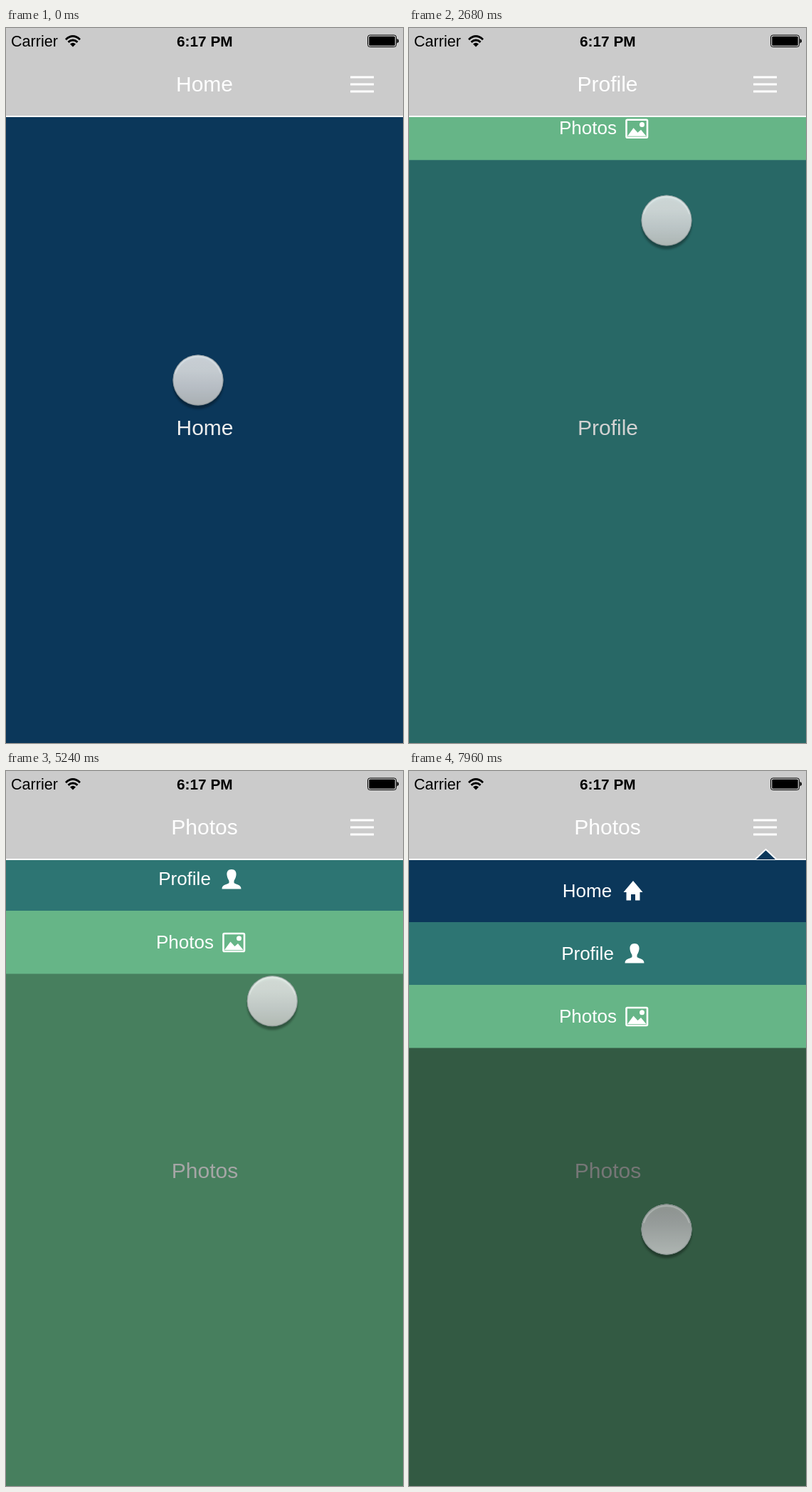
Animation of 558 by 1003 pixels, one loop 8000 ms. Source, as an HTML page:

```html
<!DOCTYPE html>
<html lang="en">
<head>
<meta charset="utf-8">
<title>Drop-down menu</title>
<style>
html, body { margin: 0; width: 100%; height: 100%; overflow: hidden; background: #0b375a; }
svg { display: block; width: 100%; height: 100%; }
text { font-family: "Liberation Sans", Arial, sans-serif; }
.big { font-size: 30px; text-anchor: middle; }
.row { font-size: 26px; text-anchor: middle; fill: #fff; }
</style>
</head>
<body>
<svg viewBox="0 0 558 1003">
  <defs>
    <linearGradient id="up" x2="0" y2="1">
      <stop offset="0" stop-color="#fff"/>
      <stop offset=".3" stop-color="#fafafa"/>
      <stop offset=".65" stop-color="#e8e8ea"/>
      <stop offset="1" stop-color="#d6d6d3"/>
    </linearGradient>
    <linearGradient id="down" x2="0" y2="1">
      <stop offset="0" stop-color="#aaa"/>
      <stop offset=".4" stop-color="#b8b8ba"/>
      <stop offset="1" stop-color="#d6d8d8"/>
    </linearGradient>
    <filter id="soft" x="-20%" y="-20%" width="140%" height="140%"><feGaussianBlur stdDeviation="1.8"/></filter>
    <clipPath id="below"><path d="M0 124H558V1003H0Z"/></clipPath>
  </defs>

  <rect id="page" width="558" height="1003"/>
  <text id="label" class="big" x="279.5" y="571" fill="#ededed"/>
  <rect id="shade" y="124" width="558" height="879"/>

  <g clip-path="url(#below)">
    <g id="menu">
      <path fill="#0b375a" d="M0 124H558V212H0Z"/>
      <path fill="#2d7573" d="M0 212H558V300H0Z"/>
      <path fill="#66b587" d="M0 300H558V388.500H0Z"/>
      <text class="row" x="250.500" y="176.500">Home</text>
      <text class="row" x="251" y="264.500">Profile</text>
      <text class="row" x="251.500" y="352.800">Photos</text>
      <g fill="#fff">
        <path d="M315 154L328.500 170H324.500V181.500H318V173H312V181.500H305.500V170H301.500Z"/>
        <path d="M317 242C322 242 324 245.500 323.500 250C323 254 321.500 256 320.500 258V261C323 263.500 330.500 263 330.500 269.500H303.500C303.500 263 311 263.500 313.500 261V258C312.500 256 311 254 310.500 250C310 245.500 312 242 317 242Z"/>
        <path d="M307 355L315.500 343.500L321.500 350L326 346L333.500 355Z"/>
        <circle cx="327.500" cy="338.700" r="3.500"/>
      </g>
      <rect x="305.500" y="332" width="29.500" height="25" rx="1.500" fill="none" stroke="#fff" stroke-width="2.600"/>
    </g>
  </g>

  <path fill="#cbcbcb" d="M0 0H558V123.500H0Z"/>
  <path stroke="#fff" stroke-width="2" d="M0 124H558"/>
  <path id="arrow" fill="#0b375a" stroke="#fff" stroke-width="2" d="M486.500 124L501.500 110L516.500 124"/>
  <text id="title" class="big" x="279" y="88.500" fill="#fff"/>
  <path id="bars" stroke="#fff" stroke-width="3" d="M484 69H517M484 79H517M484 89H517"/>

  <text x="7" y="26" font-size="21.600">Carrier</text>
  <text x="279.300" y="26" font-size="20.800" font-weight="bold" text-anchor="middle">6:17 PM</text>
  <g fill="none" stroke="#000" stroke-width="2.900">
    <path d="M84 16.200Q94 7 104 16.200M87.500 19.800Q94 14 100.500 19.800"/>
    <path fill="#000" stroke="none" d="M90 22.500Q94 19 98 22.500L94 26.500Z"/>
  </g>
  <rect x="508.500" y="10" width="40" height="16.500" rx="3" fill="none" stroke="#000"/>
  <rect x="510.300" y="11.800" width="36.400" height="12.900" rx="1.500"/>
  <path d="M549.500 15Q552 15.500 552 18.200T549.500 21.500Z"/>

  <g id="cursor">
    <circle cy="5" r="35.500" opacity=".32" filter="url(#soft)"/>
    <g opacity=".78">
      <circle r="35.500" fill="url(#up)"/>
      <g id="press"><circle r="35.500" fill="url(#down)"/></g>
    </g>
    <circle r="35" fill="none" stroke="#7c8688" stroke-opacity=".55" stroke-width="1.200"/>
    <path d="M-32 -9A33.300 33.300 0 0 1 32 -9" fill="none" stroke="#fff" stroke-opacity=".22" stroke-width="2"/>
  </g>
</svg>
<script>
const $ = id => document.getElementById(id);
const LOOP = 8000, STEP = 40, TRAVEL = 264;
const OPEN = 300, CLOSE = 500;

const pages = [
  { from: 0, name: 'Home', color: '#0b375a' },
  { from: 2346, name: 'Profile', color: '#2d7573' },
  { from: 5021, name: 'Photos', color: '#66b587' }
];
const menus = [[1150, 2346], [3980, 5021], [6349, Infinity]];
const taps = [[1070, 1150], [2330, 2440], [3830, 3980], [5020, 5130], [6230, 6345], [7850, 9000]];
const buttonTaps = [taps[0], taps[2], taps[4]];

// time, x, y
const path = [
  [0, 270, 494], [180, 270, 494], [760, 508, 74], [1300, 508, 74],
  [1680, 443, 169], [1880, 382, 236], [2160, 362, 270], [3180, 362, 270],
  [3680, 500, 70], [4140, 500, 70], [4400, 440, 198], [4880, 368, 337],
  [5140, 368, 337], [5440, 404, 258], [6030, 500, 83], [6340, 500, 83],
  [6480, 494, 129], [7310, 362, 643], [LOOP, 362, 643]
];

const clamp = v => Math.min(1, Math.max(0, v));

// cubic-bezier(.42, 0, .58, 1)
function ease(x) {
  x = clamp(x);
  let lo = 0, hi = 1, s = .5;
  for (let i = 0; i < 24; i++) {
    s = (lo + hi) / 2;
    const v = 3 * s * (1 - s) * (.42 * (1 - s) + .58 * s) + s ** 3;
    if (v < x) lo = s; else hi = s;
  }
  return s * s * (3 - 2 * s);
}

const slope = (i, k) => (path[i + 1][k] - path[i][k]) / (path[i + 1][0] - path[i][0]);

// Tangent that never overshoots, zero at rests and turns
function tangent(i, k) {
  if (i === 0 || i === path.length - 1) return 0;
  const a = slope(i - 1, k), b = slope(i, k);
  return a * b > 0 ? 2 * a * b / (a + b) : 0;
}

function along(t, k) {
  let i = 0;
  while (i < path.length - 2 && path[i + 1][0] <= t) i++;
  const p = path[i], q = path[i + 1], d = q[0] - p[0], u = (t - p[0]) / d, v = 1 - u;
  return p[k] * v * v * (1 + 2 * u) + q[k] * u * u * (3 - 2 * u)
    + d * u * v * (tangent(i, k) * v - tangent(i + 1, k) * u);
}

function openness(t) {
  const m = menus.filter(m => t >= m[0]).pop();
  if (!m) return 0;
  return t < m[1] ? ease((t - m[0]) / OPEN) : 1 - ease((t - m[1]) / CLOSE);
}

function held(t, list, fadeIn, fadeOut) {
  return Math.max(...list.map(([a, b]) =>
    t < a ? 0 : t < b ? clamp((t - a) / fadeIn) : 1 - clamp((t - b) / fadeOut)));
}

function draw(t) {
  const page = pages.filter(p => t >= p.from).pop();
  const open = openness(t);
  $('page').setAttribute('fill', page.color);
  $('label').textContent = $('title').textContent = page.name;
  $('shade').setAttribute('opacity', open / 2);
  $('menu').setAttribute('transform', `translate(0 ${-TRAVEL * (1 - open)})`);
  $('arrow').style.display = menus.some(m => t >= m[0] && t < m[1]) ? '' : 'none';
  $('bars').setAttribute('opacity', 1 - .8 * held(t, buttonTaps, 1, 350));
  $('press').setAttribute('opacity', held(t, taps, 80, 80));
  $('cursor').setAttribute('transform', `translate(${along(t, 1)} ${along(t, 2)})`);
}

const start = performance.now();
function tick() {
  const t = (performance.now() - start) % LOOP;
  draw(Math.floor(t / STEP) * STEP);
  requestAnimationFrame(tick);
}
tick();
</script>
</body>
</html>
```
